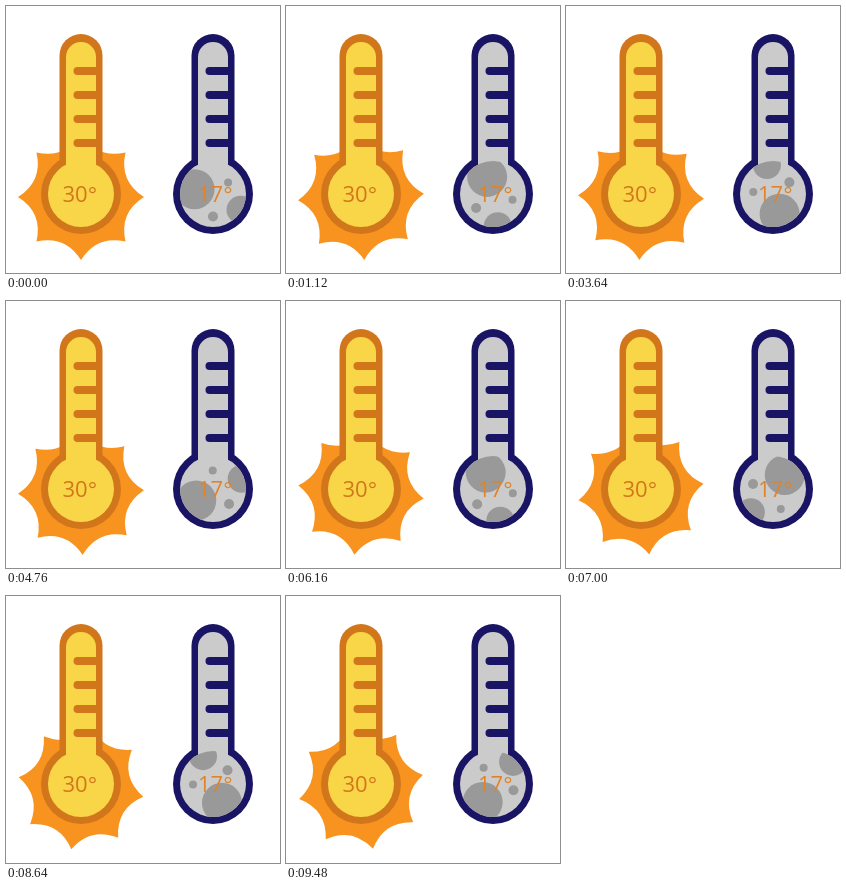
These frames come from a looping animation (274x267 px, 9960 ms). An HTML page with a canvas:

```html
<!DOCTYPE html>
<html lang="en">
<head>
<meta charset="utf-8">
<title>Day and night temperature</title>
<style>
  html, body { margin: 0; width: 100%; height: 100%; overflow: hidden; background: #fff; }
  canvas { display: block; width: 274px; height: 267px; }
</style>
</head>
<body>
<canvas id="stage"></canvas>
<script>
const WIDTH = 274, HEIGHT = 267;
const LOOP = 9960, LAST_STEP = 9480, STEP = 40;
const BULB_Y = 188;
const DAY = { x: 75, rim: '#d2761c', fill: '#f9d648', text: '30°', ink: '#d2761c' };
const NIGHT = { x: 207, rim: '#1a1464', fill: '#cbcbcb', text: '17°', ink: '#de842c' };

// Resting angle in degrees, distance from the moon's centre, radius
const CRATERS = [
  [199, 19.5, 20],
  [27.5, 31, 14],
  [90, 21, 5],
  [-41, 20, 4]
];

const canvas = document.getElementById('stage');
const ctx = canvas.getContext('2d');
const scale = window.devicePixelRatio || 1;
canvas.width = WIDTH * scale;
canvas.height = HEIGHT * scale;
ctx.scale(scale, scale);

const radians = degrees => degrees * Math.PI / 180;
const polar = (x, y, radius, degrees) => [
  x + radius * Math.cos(radians(degrees)),
  y + radius * Math.sin(radians(degrees))
];

// Steady turn that slows near the end
const sunAngle = t => 37.5 * t - 6.5 * Math.max(0, t - 8.48) ** 2;

// Accelerates from rest, then turns steadily
function moonAngle(t) {
  const speed = 70.5, ramp = 0.72;
  return t < ramp ? speed * t * t / (2 * ramp) : speed * (t - ramp / 2);
}

function disc(x, y, radius, color) {
  ctx.fillStyle = color;
  ctx.beginPath();
  ctx.arc(x, y, radius, 0, 2 * Math.PI);
  ctx.fill();
}

function drawSun(angle) {
  const x = DAY.x, y = 191, points = 8, gap = 360 / points;
  ctx.fillStyle = '#f7931e';
  ctx.beginPath();
  ctx.moveTo(...polar(x, y, 63, angle));
  for (let i = 0; i < points; i++) {
    const a = angle + i * gap;
    ctx.quadraticCurveTo(...polar(x, y, 41, a + gap / 2), ...polar(x, y, 63, a + gap));
  }
  ctx.fill();
}

function tubeAndBulb(x, top, halfWidth, radius, color) {
  ctx.fillStyle = color;
  ctx.beginPath();
  ctx.roundRect(x - halfWidth, top, 2 * halfWidth, BULB_Y - top, [halfWidth, halfWidth, 0, 0]);
  ctx.fill();
  disc(x, BULB_Y, radius, color);
}

function drawBody({ x, rim, fill }) {
  tubeAndBulb(x, 28, 21.5, 40, rim);
  tubeAndBulb(x, 36, 15, 33, fill);
  ctx.fillStyle = rim;
  for (let i = 0; i < 4; i++) {
    ctx.beginPath();
    ctx.roundRect(x - 7.5, 61 + 24 * i, 24, 8, [4, 0, 0, 4]);
    ctx.fill();
  }
}

function drawCraters(angle) {
  ctx.save();
  ctx.beginPath();
  ctx.arc(NIGHT.x, BULB_Y, 33, 0, 2 * Math.PI);
  ctx.clip();
  for (const [start, distance, radius] of CRATERS) {
    disc(...polar(NIGHT.x, 189.5, distance, start + angle), radius, '#999');
  }
  ctx.restore();
}

function drawLabel({ x, text, ink }, offset) {
  ctx.fillStyle = ink;
  ctx.font = '22px "Open Sans", sans-serif';
  ctx.fillText(text, x + offset, 196);
}

function draw(now) {
  const elapsed = Math.floor((now % LOOP) / STEP) * STEP;
  const t = Math.min(elapsed, LAST_STEP) / 1000;
  ctx.fillStyle = '#fff';
  ctx.fillRect(0, 0, WIDTH, HEIGHT);
  drawSun(sunAngle(t));
  drawBody(DAY);
  drawLabel(DAY, -18.5);
  drawBody(NIGHT);
  drawCraters(moonAngle(t));
  drawLabel(NIGHT, -15);
}

let startTime;
function tick(now) {
  startTime ??= now;
  draw(now - startTime);
  requestAnimationFrame(tick);
}
draw(0);
requestAnimationFrame(tick);
</script>
</body>
</html>
```
